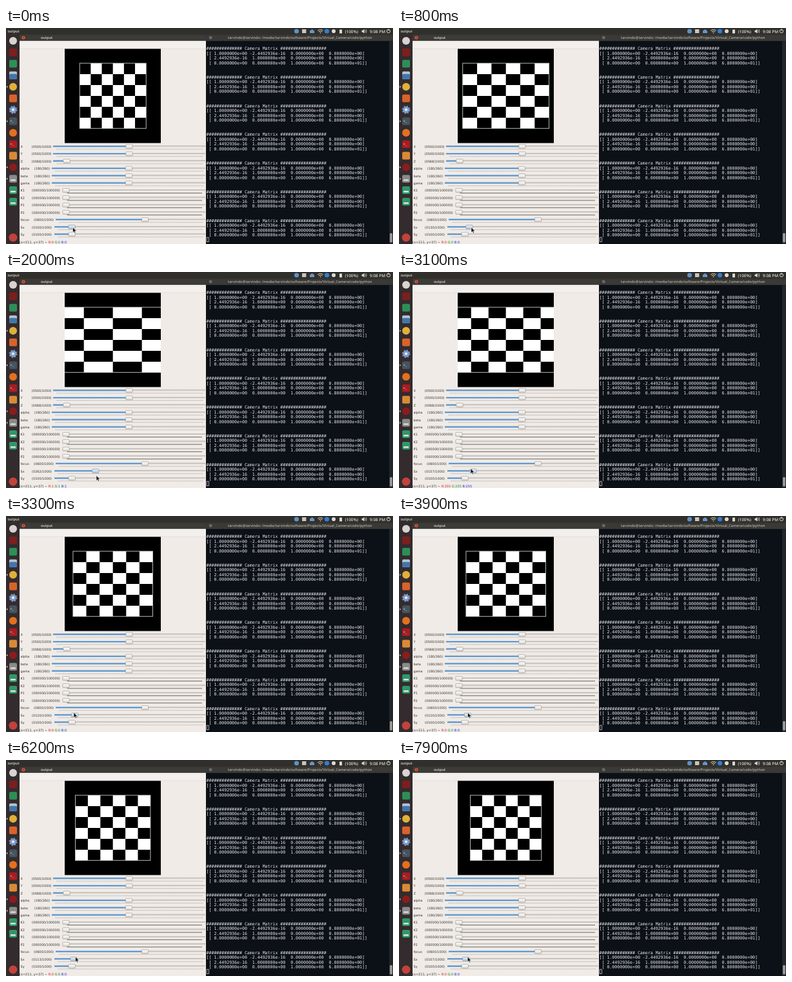
These frames come from a looping animation (600 by 337 pixels, 8000 ms). An HTML page:

```html
<!DOCTYPE html>
<html lang="en">
<head>
<meta charset="utf-8">
<title>output</title>
<style>
  html, body { margin: 0; width: 100%; height: 100%; overflow: hidden; background: #0c1017; }
  svg { display: block; width: 600px; height: 337px; }
  text { white-space: pre; text-rendering: geometricPrecision; }
  .ui { font: 600 5.5px "Open Sans", "Noto Sans", sans-serif; fill: #dfdbd2; }
  .clock { font-size: 6.4px; }
  .label { font: 5px "DejaVu Sans", sans-serif; fill: #35332f; }
  .term { font: 6.58px "DejaVu Sans Mono", monospace; fill: #e6e8ea; }
</style>
</head>
<body>
<svg id="stage" viewBox="0 0 600 337">
  <defs>
    <clipPath id="view"><rect x="91" y="32.5" width="149" height="147"/></clipPath>
    <linearGradient id="knob" x2="0" y2="1">
      <stop stop-color="#ffffff"/><stop offset="1" stop-color="#dedad6"/>
    </linearGradient>
    <linearGradient id="hot" x2="0" y2="1">
      <stop stop-color="#e8f1fb"/><stop offset="1" stop-color="#a9c8e8"/>
    </linearGradient>
  </defs>
</svg>
<script>
const NS = 'http://www.w3.org/2000/svg';
const stage = document.getElementById('stage');
const LOOP = 8000, STEP = 100;

function add(tag, attrs, parent = stage) {
  const el = document.createElementNS(NS, tag);
  for (const k in attrs) el.setAttribute(k, attrs[k]);
  return parent.appendChild(el);
}
const rect = (x, y, width, height, fill, more) => add('rect', { x, y, width, height, fill, ...more });
const disc = (cx, cy, r, fill, more) => add('circle', { cx, cy, r, fill, ...more });
const path = (d, more) => add('path', { d, fill: 'none', ...more });
function text(x, y, str, cls, more) {
  const el = add('text', { x, y, class: cls, ...more });
  el.textContent = str;
  return el;
}

// Desktop panel
function drawPanel() {
  rect(0, 0, 600, 11, '#302f2c');
  text(2.5, 7.2, 'output', 'ui', { 'font-weight': 700 });
  disc(450.5, 5, 3.6, '#5b93c9');
  rect(459, 2, 6.4, 6, '#c9c6c0');
  path('M471 8V4.5L474.5 2L478 4.5V8Z', { fill: '#6c94c4' });
  path('M483.2 4.2Q487.5 .8 491.8 4.2M484.8 5.8Q487.5 3.8 490.2 5.8', { stroke: '#dfdbd2', 'stroke-width': 1 });
  disc(487.5, 7.6, .8, '#dfdbd2');
  disc(497.5, 5, 3.6, '#2f7fd6');
  disc(508, 5, 3, '#dfdbd2');
  rect(517, 2.4, 4, 6, '#dfdbd2', { rx: .6 });
  text(525.5, 7.5, '(100%)', 'ui clock');
  path('M551.5 3.8H553L555.5 1.8V8.4L553 6.4H551.5Z', { fill: '#dfdbd2' });
  path('M556.6 3.2Q558 5 556.6 7M558 2Q560.3 5 558 8.2', { stroke: '#dfdbd2', 'stroke-width': .7 });
  text(564, 7.5, '9:08 PM', 'ui clock');
  disc(593, 5, 2.7, 'none', { stroke: '#dfdbd2', 'stroke-width': .9 });
  path('M593 1.5V4.8', { stroke: '#dfdbd2', 'stroke-width': .9 });
}

// Launcher column
function drawLauncher() {
  rect(0, 11, 21, 326, '#332b2e');
  const icons = [
    ['disc', '#d8d3d0'], ['tile', '#7c1f1d'], ['tile', '#2d8f57'], ['files', '#b9c3cc'],
    ['disc', '#e0b13a'], ['tile', '#d9632a'], ['gear', '#7d9cc8'], ['shell', '#46545f'],
    ['disc', '#e5701e'], ['shell', '#a81d22'], ['tile', '#d98a35'], ['disc', '#8c1c1c'],
    ['drive', '#8a8a88'], ['drive', '#2f9868'], ['drive', '#2f9868']
  ];
  icons.forEach(([kind, fill], i) => {
    const y = 20 + i * 17.93;
    if (kind === 'disc') return disc(11, y, 6, fill);
    if (kind === 'gear') {
      disc(11, y, 5.2, fill);
      disc(11, y, 5.6, 'none', { stroke: fill, 'stroke-width': 1.6, 'stroke-dasharray': '2.2' });
      return disc(11, y, 2, '#eef2f6');
    }
    rect(5, y - 6, 12, 12, fill, { rx: 2 });
    if (kind === 'files') rect(5, y - 2, 12, 8, '#3f76ad', { rx: 1.5 });
    if (kind === 'shell') text(6.5, y + 1.5, '>_', 'ui');
    if (kind === 'drive') rect(7, y + 1, 8, 2.4, '#dfe3df', { rx: .6 });
  });
  for (const i of [4, 7, 11, 12]) {
    const y = 20 + i * 17.93;
    path(`M1 ${y - 1.5}L3 ${y}L1 ${y + 1.5}Z`, { fill: '#d8d3d0' });
  }
  disc(11, 327, 6.5, '#c2423c');
}

// Terminal window
function drawTerminal() {
  rect(310, 11, 290, 326, '#0c1017');
  rect(310, 10.5, 290, 9.8, '#3a3935');
  for (const x of [317.2]) disc(x, 15, 2.5, '#6a6862');
  text(344, 16.8, 'tarvindo@tarvindo: /media/tarvindo/software/Projects/Virtual_Camera/code/python',
    'ui', { fill: '#aaa69d', style: 'fill:#b4b0a7' });
  const block = [
    '#'.repeat(14) + ' Camera Matrix ' + '#'.repeat(18),
    '[[ 1.0000000e+00 -2.4492936e-16  0.0000000e+00  0.0000000e+00]',
    ' [ 2.4492936e-16  1.0000000e+00  0.0000000e+00  0.0000000e+00]',
    ' [ 0.0000000e+00  0.0000000e+00  1.0000000e+00  6.8000000e+01]]'
  ];
  for (let b = 0; b < 7; b++)
    block.forEach((line, i) => text(310.5, 34.2 + (b * 6 + i) * 7.46, line, 'term'));
  rect(311.2, 326.8, 3.2, 6.8, 'none', { stroke: '#e6e8ea', 'stroke-width': .7 });
  rect(594, 20.3, 6, 316.7, '#22252a');
  rect(595, 320, 4, 14.5, '#9b9995', { rx: 1.5 });
}

// Image window with sliders
function drawWindow() {
  rect(21, 11, 289, 326, '#f0ebe7');
  rect(21, 10.5, 289, 9.8, '#3c3b37');
  disc(27, 15, 2.6, '#e0563b');
  path('M26 14L28 16M28 14L26 16', { stroke: '#4a2018', 'stroke-width': .6 });
  text(54, 16.8, 'output', 'ui');
  rect(21, 20.3, 288.5, 11.7, '#f3efec');
  rect(21, 31.8, 288.5, .5, '#d8d2cc');
  rect(91, 32.5, 149, 147, '#000');
}

function slider(row, name, value, vx, start, knobX, fill = 'url(#knob)') {
  const y = 185 + row * 11.42, dense = name[0] === 'K' || name[0] === 'P';
  text(22.5, y + 1.9, name, 'label');
  const label = text(vx, y + 1.9, value, 'label');
  rect(start, y - 1.4, 309 - start, 2.2, '#d9d4cf');
  rect(start, y - 1.4, 309 - start, .6, '#a5a09a');
  const bar = rect(start, y - 1.4, knobX - start, 2.2, '#5f9bd3');
  path(`M${start + 5.5} ${y + 4}H${dense ? 304 : 306}`, {
    stroke: dense ? '#5a5855' : '#98948f', 'stroke-width': dense ? .9 : .7,
    'stroke-dasharray': dense ? 'none' : '1.5 .8'
  });
  const knob = rect(knobX - 5.2, y - 3.2, 10.4, 6, fill, { rx: 1, stroke: '#8f8a85', 'stroke-width': .6 });
  return sx => {
    const x = 79.5 + .2265 * sx;
    label.textContent = `(${String(sx).padStart(4, '0')}/1000)`;
    bar.setAttribute('width', x - start);
    knob.setAttribute('x', x - 5.2);
  };
}

function drawSliders() {
  slider(0, 'X', '(0500/1000)', 39.5, 73, 191);
  slider(1, 'Y', '(0500/1000)', 39.5, 73, 191);
  slider(2, 'Z', '(0068/1000)', 39.5, 73, 94);
  ['alpha', 'beta', 'gama'].forEach((n, i) => slider(3 + i, n, '(180/260)', 43.5, 71, 190.5));
  ['K1', 'K2', 'P1', 'P2'].forEach((n, i) => slider(6 + i, n, '(000000/100000)', 40, 89, 93));
  slider(10, 'focus', '(0600/1000)', 43, 77, 215.5);
  slider(12, 'Sy', '(0100/1000)', 40, 75, 102.2);
  return slider(11, 'Sx', '', 40, 75, 102, 'url(#hot)');
}

// Checkerboard centred in the view; only its width follows Sx
function makeBoard() {
  const g = add('g', { 'clip-path': 'url(#view)' });
  const cells = [];
  for (let r = 0; r < 6; r++)
    for (let c = 0; c < 6; c++)
      if ((r + c) % 2) cells.push([c, add('rect', { y: 55 + r * 17, height: 17, fill: '#fff' }, g)]);
  const frame = add('rect', { y: 55, height: 101.7, fill: 'none', stroke: '#c6d2c6', 'stroke-width': .9 }, g);
  return sx => {
    const w = 1.03 * sx, left = 165.7 - w / 2;
    for (const [c, el] of cells) {
      el.setAttribute('x', left + c * w / 6);
      el.setAttribute('width', w / 6);
    }
    frame.setAttribute('x', left);
    frame.setAttribute('width', w);
  };
}

function makeStatus() {
  const el = text(21, 335.6, '', 'label');
  const parts = ['#35332f', '#e02020', '#108a10', '#2020d8'].map(c => add('tspan', { style: `fill:${c}` }, el));
  parts[0].textContent = '(x=211, y=37) ~ ';
  return sx => {
    const v = sx < 140 ? 0 : sx < 200 ? 255 : 1;
    ['R', 'G', 'B'].forEach((n, i) => parts[i + 1].textContent = `${n}:${v} `);
  };
}

drawPanel();
drawTerminal();
drawWindow();
drawLauncher();
const setSlider = drawSliders();
const setBoard = makeBoard();
const setStatus = makeStatus();
const pointer = path('M0 0V8L1.9 6.4L3.2 9.2L4.5 8.6L3.3 5.9H5.8Z',
  { fill: '#111', stroke: '#fff', 'stroke-width': .6 });

// time, Sx, pointer x, pointer y
const keys = [
  [0, 100, 103.5, 311], [100, 100, 103.5, 311], [800, 130, 112, 311],
  [2000, 262, 140, 317.5], [2500, 262, 140, 316], [3100, 157, 111, 306.5],
  [3300, 120, 105, 306.5], [4700, 120, 108.5, 307], [5600, 120, 108.5, 307],
  [6200, 113, 107.5, 307], [6800, 113, 107.5, 307], [7600, 111, 107, 307],
  [7700, 111, 107, 307], [7900, 107, 106.2, 307], [8000, 107, 106.2, 307]
];

function stateAt(t) {
  const i = keys.findIndex(k => k[0] > t), a = keys[i - 1], b = keys[i];
  const p = (t - a[0]) / (b[0] - a[0]);
  return a.map((v, n) => v + (b[n] - v) * p);
}

function draw() {
  const t = Math.floor(performance.now() % LOOP / STEP) * STEP;
  const [, value, x, y] = stateAt(t);
  const sx = Math.round(value);
  setSlider(sx);
  setBoard(sx);
  setStatus(sx);
  pointer.setAttribute('transform', `translate(${x} ${y})`);
  requestAnimationFrame(draw);
}
draw();
</script>
</body>
</html>
```
